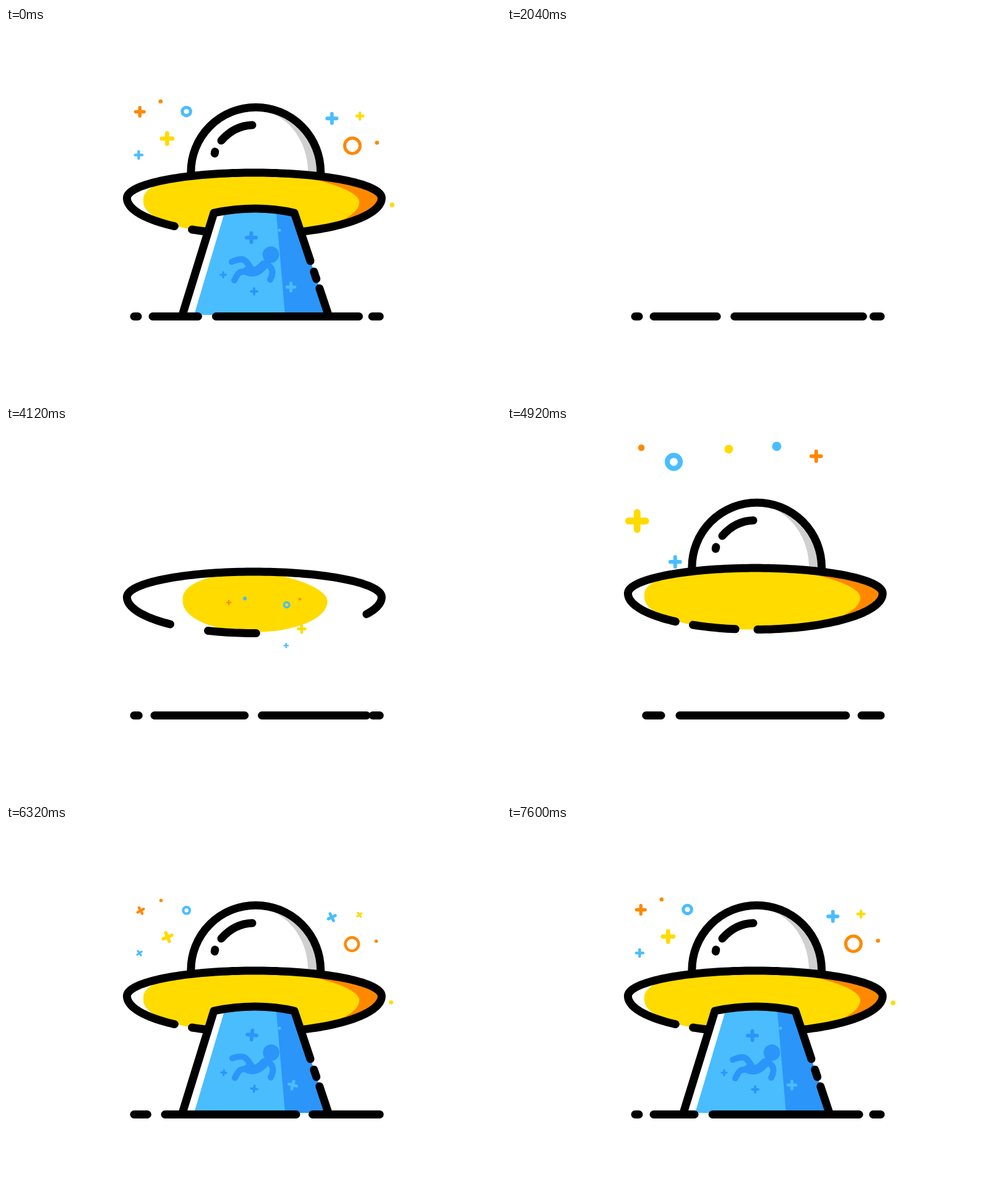
An HTML page with a canvas that plays this animation: 800x600 px, repeating every 7.64 s.

```html
<!DOCTYPE html>
<html lang="en">
<head>
<meta charset="utf-8">
<title>Saucer</title>
<style>
html, body { margin: 0; width: 100%; height: 100%; overflow: hidden; background: #fff; }
canvas { display: block; width: 800px; height: 600px; }
</style>
</head>
<body>
<canvas id="stage" width="800" height="600"></canvas>
<script>
const ctx = document.getElementById('stage').getContext('2d');
const LOOP = 7640, DASH = 1910, RAD = Math.PI / 180, STROKE = 13;
const YELLOW = '#ffdb00', ORANGE = '#ff8800', BLUE = '#4abdff', DEEP = '#2b95fa', GREY = '#d0d0d0';

// Easing: every helper maps time to 0..1
const clamp = x => Math.min(1, Math.max(0, x));
function ramp(t, from, to) {
  const x = clamp((t - from) / (to - from));
  return x * x * (3 - 2 * x);
}
const outCubic = x => 1 - Math.pow(1 - clamp(x), 3);
function outBack(x) {
  const r = clamp(x) - 1;
  return 1 + 2.7 * r * r * r + 1.7 * r * r;
}
const mix = (a, b, k) => a + (b - a) * k;

// Drawing helpers
function trace(pts) {
  ctx.beginPath();
  pts.forEach(p => ctx.lineTo(p[0], p[1]));
}
function stroke(w = STROKE, color = '#000') {
  ctx.lineWidth = w;
  ctx.strokeStyle = color;
  ctx.stroke();
}
function fill(color) {
  ctx.fillStyle = color;
  ctx.fill();
}
function line(pts, w, color) {
  trace(pts);
  stroke(w, color);
}
function poly(pts, color) {
  trace(pts);
  fill(color);
}
function dot(x, y, r, color) {
  ctx.beginPath();
  ctx.arc(x, y, r, 0, 7);
  fill(color);
}
function ring(x, y, r, w, color) {
  ctx.beginPath();
  ctx.arc(x, y, r, 0, 7);
  stroke(w, color);
}
function plus(x, y, span, color, rot = 0, w = span * .28) {
  const h = (span - w) / 2;
  ctx.save();
  ctx.translate(x, y);
  ctx.rotate(rot * RAD);
  line([[-h, 0], [h, 0]], w, color);
  line([[0, -h], [0, h]], w, color);
  ctx.restore();
}
// size: span of a plus, outer radius of a ring or hoop, radius of a dot
function shape(kind, color, x, y, size, rot) {
  if (size < .3) return;
  if (kind === 'plus') plus(x, y, size, color, rot);
  else if (kind === 'ring') ring(x, y, size * .72, size * .56, color);
  else if (kind === 'hoop') ring(x, y, size * .83, size * .34, color);
  else dot(x, y, size, color);
}
function scaled(x, y, sx, sy, draw) {
  ctx.save();
  ctx.translate(x, y);
  ctx.scale(sx, sy);
  ctx.translate(-x, -y);
  draw();
  ctx.restore();
}

// Ground: gaps creep in, sweep across and creep out of a fixed line.
const sweep = p => 1 / (1 + Math.exp((370 - p) / 270));
const gapLeft = p => 181 + 32 * ramp(p, -3300, -2300) + 32 * ramp(p, -1700, -900) +
  323 * sweep(p) + 25 * ramp(p, 1700, 2600);
const gapRight = p => 205 + 32 * ramp(p, -3300, -2300) + 38 * ramp(p, -1750, -900) + 318 * sweep(p);

function ground(t) {
  const y = 466.5;
  let x = 207;
  for (let k = -2; k <= 1; k++) {
    const p = t % DASH + k * DASH, l = Math.min(593, gapLeft(p));
    if (l >= x) line([[x, y], [l, y]]);
    x = Math.max(x, gapRight(p));
  }
  line([[x, y], [604, y]]);
}

// Drop that leaps up, swings right, hovers and falls
const dropX = u => 404 + 46 * Math.exp(-Math.pow((u - 2680) / 190, 2));
const dropY = u => 59 + 407 * Math.exp(-Math.max(0, u - 2300) / 78) + 176 * Math.pow(clamp((u - 3200) / 220), 3);
function drop(u) {
  if (u < 2300 || u > 3440) return;
  for (let p = 0; p <= 1; p += .03) {
    const at = u - 100 * (1 - p);
    dot(dropX(at), dropY(at), 3 + 6 * p, '#000');
  }
}

// Confetti: one arrangement, thrown out and drawn back to its centre
const bits = [
  ['plus', ORANGE, -42, -53, 9.5], ['dot', BLUE, -14, -60, 3.3], ['dot', YELLOW, 20, -58, 3.1],
  ['ring', BLUE, 59, -49, 6.4], ['dot', ORANGE, 82, -59, 2.3], ['plus', YELLOW, 85, -7, 17],
  ['plus', BLUE, 58, 22, 9.5]
];
const bursts = [
  { x: 408, y: 466, fx: 1, fy: 1, peak: 1.8, from: 2340, to: 3450, hold: 610 },
  { x: 399, y: 333, fx: 1, fy: 1, peak: 1.8, from: 3575, to: 4500, hold: 610 },
  { x: 404, y: 168, fx: -1, fy: 1, peak: 2.33, from: 4660, to: 5900, hold: 5400 },
  { x: 409, y: 126, fx: -1, fy: -1, peak: 1.2, from: 4950, to: 5800, hold: 610 },
  { x: 407, y: 304, fx: -1, fy: -1, peak: .36, from: 5380, to: 5720, hold: 610 }
];
function confetti(u) {
  for (const b of bursts) {
    const age = u - b.from;
    if (age <= 0 || u >= b.to) continue;
    const s = b.peak * outCubic(age / 140) * Math.exp(-Math.max(0, age - 140) / b.hold) *
      (1 - ramp(u, b.to - 220, b.to));
    for (const [kind, color, x, y, size] of bits)
      shape(kind, color, b.x + x * s * b.fx, b.y + y * s * b.fy, size * s, 0);
  }
}

// Saucer
function rim(from, to) {
  const pts = [], n = Math.max(2, Math.ceil((to - from) / 2));
  for (let i = 0; i <= n; i++) {
    const a = mix(from, to, i / n) * RAD, s = Math.sin(a);
    pts.push([401.3 + 205.8 * Math.cos(a), 275 + (s > 0 ? 58.5 : 41) * s]);
  }
  return pts;
}
function paint(u) {
  const sx = ramp(u, 3800, 4320), all = rim(0, 360);
  if (sx === 0) return;
  ctx.save();
  trace(all);
  ctx.clip();
  ctx.fillStyle = '#fff';
  ctx.fillRect(180, 225, 440, 115);
  const d = 40 * ramp(u, 4120, 4450);
  if (d > 0) {
    ctx.fillStyle = ORANGE;
    ctx.fillRect(400, 225, 220, 115);
    if (d < 40) poly(all.map(p => [p[0] - d, p[1] + d / 4]), '#fff');
  }
  scaled(415, 286, sx, ramp(u, 3700, 4200), () => {
    ctx.beginPath();
    ctx.moveTo(222, 276);
    ctx.bezierCurveTo(222, 256, 270, 232, 396, 232);
    ctx.bezierCurveTo(460, 232, 571, 256, 571, 282);
    ctx.ellipse(396.5, 282, 174.5, 53, 0, 0, Math.PI);
    fill(YELLOW);
  });
  ctx.restore();
}
function saucer(u) {
  if (u < 3420) return;
  paint(u);
  line(rim(mix(270, 128.8, outCubic((u - 3420) / 946)), mix(270, 449, ramp(u, 3420, 4570))));
  if (u > 3900) line(rim(80 + 19 * ramp(u, 3900, 4350), 80 + 39.3 * ramp(u, 3850, 4230)));
}

function dome(u) {
  const s = outBack((u - 4350) / 400), x = 403.7, y = 233, r = 104.8;
  if (s < .02) return;
  scaled(x, 236, s, s, () => {
    ctx.beginPath();
    ctx.arc(x, y, r, Math.PI, 0);
    fill(GREY);
    ctx.beginPath();
    ctx.ellipse(400, y, 88, 101, 0, -Math.PI / 2, 0);
    ctx.lineTo(x - r, y);
    ctx.arc(x, y, r, Math.PI, 1.5 * Math.PI);
    fill('#fff');
    ctx.beginPath();
    ctx.moveTo(x - r, y + 5);
    ctx.arc(x, y, r, Math.PI, 0);
    ctx.lineTo(x + r, y + 5);
    stroke();
    ctx.beginPath();
    ctx.moveTo(348, 182);
    ctx.quadraticCurveTo(369, 158, 398, 157);
    stroke();
    line([[337.8, 200], [337.2, 203]]);
  });
}

// Light beam with its passenger
function limb(a, b, c, d, w = 10) {
  ctx.beginPath();
  ctx.moveTo(...a);
  ctx.bezierCurveTo(...b, ...c, ...d);
  stroke(w, DEEP);
}
function passenger(k) {
  ctx.save();
  ctx.translate(k, -k * .6);
  limb([365, 378 - 2 * k], [384, 370], [387, 374], [396, 389]);
  limb([369, 408], [378, 389], [381, 395], [394, 394]);
  limb([390, 393], [401, 397], [408, 393], [417, 383], 15);
  limb([420, 380], [430, 387], [434, 393], [427, 407]);
  ctx.restore();
  dot(428 + k * .5, 366.5, 13.3, DEEP);
}
const settle = u => 1 - ramp(u, 6250, 7500);

function cargo(u) {
  const size = ramp(u, 5750, 6100) - ramp(u, 8660, 8780), k = settle(u);
  if (size < .01) return;
  scaled(404, 385, size, size, () => {
    plus(396.5 + k, 339 - k, 21, DEEP, 6 * k);
    plus(351 + k, 399, 11.5, DEEP, 6 * k);
    plus(401, 426 - k, 13.5, DEEP, 6 * k);
    plus(460.5 + 3 * k, 419, 17.5, BLUE, 15 * k);
    dot(442, 327, 2.5, BLUE);
    passenger(k);
  });
}
function beam(u, dy) {
  const reach = ramp(u, 5360, 5565) - ramp(u, 8820, 8920);
  const spread = .017 + .983 * (ramp(u, 5530, 5950) - ramp(u, 8680, 8840));
  if (reach < .01) return;
  const top = 299 + dy, end = mix(top, 461, reach), low = end + 3, high = top - 10;
  const X = x => mix(404, x, spread);
  const right = p => [X(466 + 54 * p), mix(top, end, p)];
  const hood = y => {
    ctx.beginPath();
    ctx.moveTo(X(286), y);
    ctx.lineTo(X(336), top);
    ctx.quadraticCurveTo(404, top - 14 * spread, X(466), top);
  };

  ctx.save();
  hood(low);
  ctx.lineTo(X(521), low);
  fill('#fff');
  ctx.clip();
  poly([[X(356), high], [X(304), low], [X(530), low], [X(480), high]], BLUE);
  poly([[X(436), high], [X(451), low], [X(530), low], [X(480), high]], DEEP);
  cargo(u);
  ctx.restore();

  hood(end);
  ctx.lineTo(...right(.481));
  stroke();
  line([right(.586), right(.66)]);
  line([right(.753), right(1)]);
}

// Sparkles fly out of both ends of the dome, then turn upright.
const sparkles = [
  ['plus', ORANGE, 216.3, 135.5, 19], ['dot', ORANGE, 249.8, 118.8, 3.3], ['ring', BLUE, 291.6, 135, 9.3],
  ['plus', YELLOW, 260.4, 178.8, 24], ['plus', BLUE, 214.4, 205.3, 15.5], ['plus', BLUE, 526.7, 146.3, 21],
  ['plus', YELLOW, 572, 142.4, 15], ['hoop', ORANGE, 559.8, 190.5, 15], ['dot', ORANGE, 599.6, 185.5, 3.3],
  ['dot', YELLOW, 624, 286, 3.8]
];
function sky(u) {
  if (u > 5400 && u < 5640) {
    const p = ramp(u, 5400, 5500) - ramp(u, 5540, 5640);
    ring(300, 230, 5 * p, 2.3 * p, YELLOW);
    ring(515, 230.7, 5.6 * p, 2.5 * p, BLUE);
  }
  if (u < 5540) return;
  const e = 1 - Math.exp((5540 - u) / 185), k = settle(u), grow = e * (1 - ramp(u, 8660, 9040));
  for (const [kind, color, x, y, size] of sparkles) {
    const cut = kind === 'dot' ? .5 : kind === 'plus' ? 3.5 : 1.8;
    shape(kind, color, mix(x < 404 ? 300 : 515, x, e), mix(230, y, e), (size - cut * k) * grow, -550 / size * k);
  }
}

function draw(t) {
  const u = t < 2000 ? t + LOOP : t;
  const dy = -8 * (ramp(u, 4760, 5000) - ramp(u, 5560, 5850));
  const size = 1 - ramp(u, 8840, 9180);
  ctx.fillStyle = '#fff';
  ctx.fillRect(0, 0, 800, 600);
  ctx.lineCap = ctx.lineJoin = 'round';
  if (size > .01) scaled(404, 280, size, size, () => {
    ctx.save();
    ctx.translate(0, dy);
    dome(u);
    saucer(u);
    ctx.restore();
    beam(u, dy);
  });
  ground(t);
  drop(u);
  sky(u);
  confetti(u);
}

const start = performance.now();
function tick() {
  const t = (performance.now() - start) % LOOP;
  draw(Math.floor(t / 40) * 40);
  requestAnimationFrame(tick);
}
tick();
</script>
</body>
</html>
```
